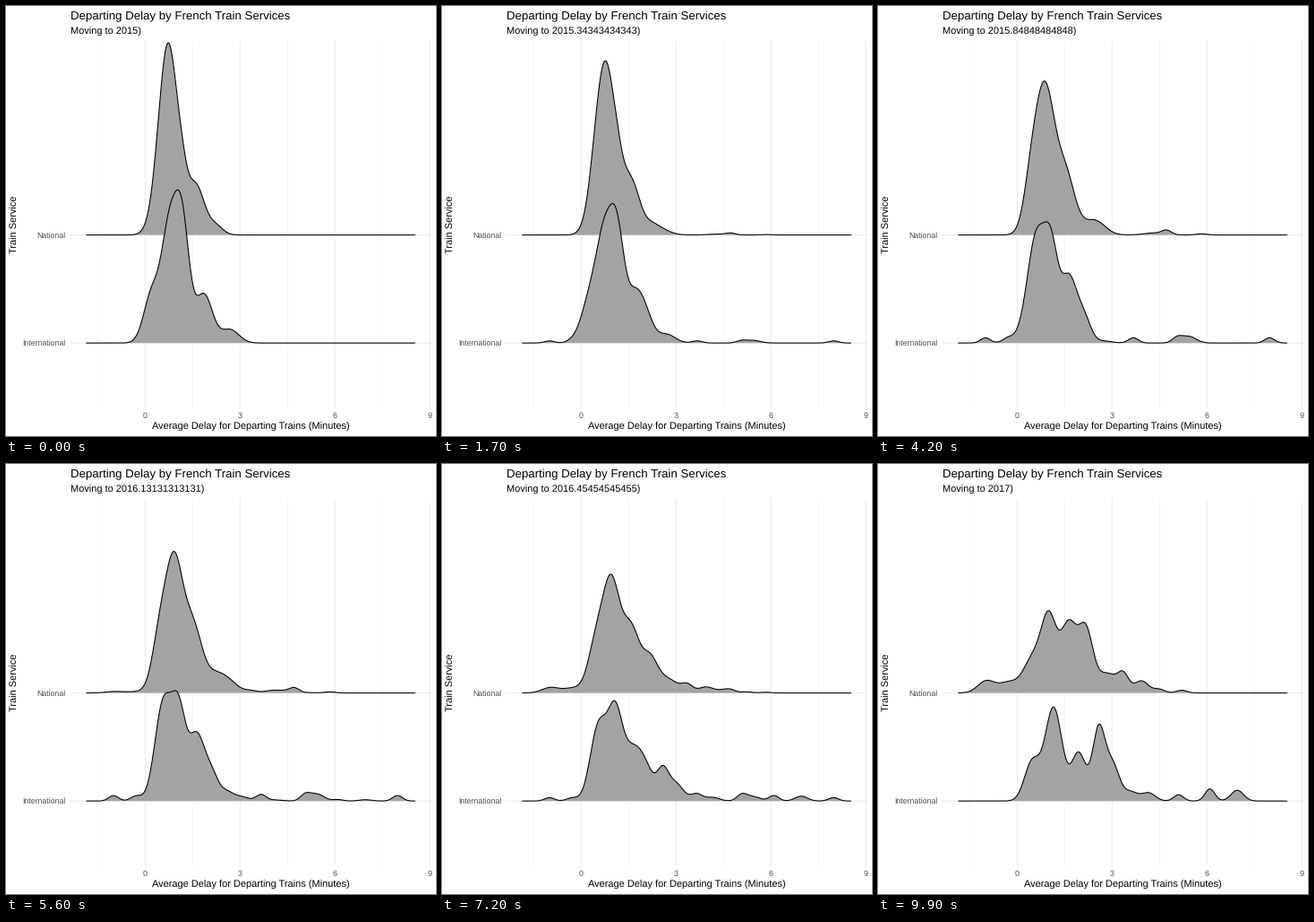
Recreate the animation shown at these times as a matplotlib script. Size 480 by 480 pixels, loop 10 s.

```python
import numpy as np
import matplotlib.pyplot as plt
from matplotlib.animation import FuncAnimation

plt.rcParams.update({
    "font.family": "Liberation Sans",
    "text.hinting": "none",
    "path.snap": False,
})

SIZE, DPI = 480, 72
FRAMES, MID = 100, 50
ZERO, UNIT = 155.5, 35.27            # pixel of 0 minutes, pixels per minute
LEFT, RIGHT, TOP, BOTTOM = 71.7, 474.5, 39, 448.5
GRID, GREY = "#ebebeb", "#4d4d4d"
THICK = 1.07
X = np.linspace(90, 456.2, 512)


def humps(*parts):
    """Sum of bell curves, each given as (centre, width, height) in pixels."""
    return sum(h * np.exp(-0.5 * ((X - c) / w) ** 2) for c, w, h in parts)


# One density per year: 2015, 2016, 2017.
national = [
    humps((181, 10.9, 214), (197, 5.5, 20), (212, 9.5, 54), (234, 8, 10)),
    humps((172, 8.5, 68), (187, 9, 130), (206, 12, 82), (243, 11, 18),
          (306, 10, 2.6), (322, 5.5, 6), (361, 6, 1.5)),
    humps((121, 9.5, 13.5), (145, 10, 11), (173, 11, 38), (191, 8.5, 78),
          (213, 9, 75), (232, 8, 67), (256, 11, 21.5), (274, 6, 18),
          (294, 8, 13.5), (314, 6, 4), (339, 6, 3)),
]
international = [
    humps((163, 9, 55), (182, 8.5, 118), (196.5, 8, 130), (221, 9.5, 54),
          (250, 10, 15)),
    humps((120, 5.5, 6.9), (145, 6, 6.2), (176, 9.5, 119), (192.7, 7.5, 90),
          (213, 9, 79), (231, 7, 25), (285, 5.5, 7), (334, 5.5, 7),
          (347, 8, 8.8), (437, 5.5, 7)),
    humps((172, 8.5, 43), (196, 9.5, 104), (224, 8, 53), (246.5, 7, 80),
          (262, 7.5, 39), (282, 8, 10), (302, 7.5, 9), (335.5, 5.5, 7),
          (370.5, 5.5, 13.5), (401, 7, 12)),
]
services = [("National", 255.6, national),
            ("International", 376.2, international)]

fig = plt.figure(figsize=(SIZE / DPI, SIZE / DPI), dpi=DPI, facecolor="white")
ax = fig.add_axes([0, 0, 1, 1])
ax.set(xlim=(0, SIZE), ylim=(SIZE, 0))
ax.axis("off")


def label(x, y, s, size=11, color="black", **kw):
    return ax.text(x, y, s, size=size, color=color, va="baseline", **kw)


for minutes in np.arange(-1.5, 9.1, 1.5):
    x = ZERO + UNIT * minutes
    major = minutes % 3 == 0
    ax.plot([x, x], [TOP, BOTTOM], color=GRID, lw=THICK if major else THICK / 2)
    if major:
        label(x, 460, f"{minutes:.0f}", 8.8, GREY, ha="center")

label(LEFT, 15, "Departing Delay by French Train Services", 13.2)
subtitle = label(LEFT, 32, "")
label((LEFT + RIGHT) / 2, 473, "Average Delay for Departing Trains (Minutes)",
      ha="center")
label(13.3, (TOP + BOTTOM) / 2, "Train Service", ha="center", rotation=90,
      rotation_mode="anchor")

ridges = []
for z, (name, base, years) in enumerate(services, start=3):
    ax.plot([LEFT, RIGHT], [base, base], color=GRID, lw=THICK)
    label(66.8, base + 3.1, name, 8.8, GREY, ha="right")
    fill, = ax.fill(X, X * 0 + base, color="#a3a3a3", lw=0, zorder=z)
    line, = ax.plot(X, X * 0 + base, color="black", lw=THICK, zorder=z + 0.5)
    ridges.append((base, years, fill, line))


def update(i):
    subtitle.set_text(f"Moving to {2015 + 2 * i / (FRAMES - 1):.15g})")
    if i < MID:
        k, t = 0, i / MID
    else:
        k, t = 1, (i - MID) / (FRAMES - 1 - MID)
    for base, years, fill, line in ridges:
        y = base - ((1 - t) * years[k] + t * years[k + 1])
        line.set_ydata(y)
        outline = np.column_stack([X, y])
        fill.set_xy(np.vstack([[X[0], base], outline, [X[-1], base]]))
    return [subtitle] + [artist for r in ridges for artist in r[2:]]


anim = FuncAnimation(fig, update, frames=FRAMES, interval=100, repeat=True)
plt.show()
```
